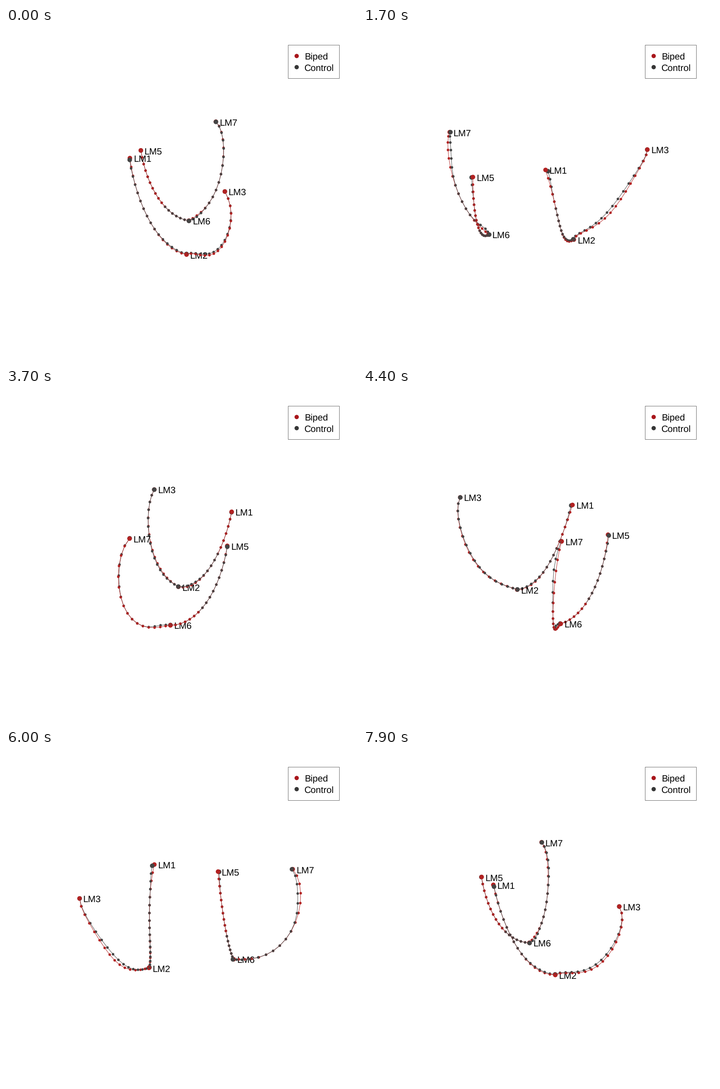
A matplotlib script that plays this animation: 768x729 px, repeating every 8 s.

```python
import numpy as np
import matplotlib.pyplot as plt
from matplotlib.animation import FuncAnimation
from matplotlib.patches import Circle, Rectangle

W, H, DPI = 768, 729, 100
PX = 72 / DPI                          # one pixel in points
FRAMES, STEP = 80, np.radians(4.8)     # one turn takes 75 frames
TILT = np.radians(20)
FOCAL = H / 2 / np.tan(np.radians(15))
RED, DARK = "#b22222", "#444444"
LANDMARKS = [0, 16, 32]
KNOTS = np.array([0, 4, 12, 16, 18, 22, 26, 30, 32])

# Key points are (right, toward the viewer, up) from the scene centre.
# The control curve adds soft bumps: (place, width, toward, up).
CURVES = [
    dict(names=("LM1", "LM2", "LM3"),
         keys=[(-108, 30, 92), (-92.4, 46, 20.3), (-30.3, 64, -90.5),
               (10.7, 78.6, -107.5), (29.8, 92.6, -99.6), (65, 144.3, -74.2),
               (88.3, 188.7, -14.4), (88.5, 224.5, 59.6), (77.6, 231, 89.7)],
         bumps=[(0, 2, 5, -2.4), (13, 3, 0, 2.4), (23, 5, -8, 0)]),
    dict(names=("LM5", "LM6", "LM7"),
         keys=[(-95, -121, 65.6), (-80.4, -124.6, -0.5), (-22.1, -123.6, -94),
               (18, -119, -111), (37.5, -138.5, -105.5), (78.6, -186.7, -74.4),
               (103.7, -223.2, -3), (99.4, -229.3, 81.8), (84.5, -219, 110.8)],
         bumps=[(0, 2, -2.7, -0.9), (18, 1.6, 8, 0), (29, 2.5, 7, 0)]),
]


def smooth(knots, values, at):
    """Polynomial through the knots, evaluated at the given places."""
    n = len(knots)
    return np.vander(at / 16, n) @ np.linalg.solve(np.vander(knots / 16, n), values)


def sample(keys):
    """33 points along a curve, with a free corner at the middle landmark."""
    keys = np.array(keys, float)
    return np.vstack([smooth(KNOTS[:4], keys[:4], np.arange(16)),
                      smooth(KNOTS[3:] - 16, keys[3:], np.arange(17))])


def shift(points, bumps):
    moved, i = points.copy(), np.arange(len(points))
    for place, width, toward, up in bumps:
        moved += np.outer(np.exp(-((i - place) / width) ** 2), (0, toward, up))
    return moved


def project(points, angle):
    """Spin about the upright axis, tilt, and project to pixels and depth."""
    a, b, up = points.T
    c, s = np.cos(angle), np.sin(angle)
    right, near = a * c + b * s, b * c - a * s
    depth = near * np.cos(TILT) + up * np.sin(TILT)
    scale = FOCAL / (FOCAL - depth)
    height = up * np.cos(TILT) - near * np.sin(TILT)
    return W / 2 + right * scale, H / 2 - height * scale, depth


plt.rcParams["text.hinting"] = "none"
fig = plt.figure(figsize=(W / DPI, H / DPI), dpi=DPI, facecolor="white")
ax = fig.add_axes([0, 0, 1, 1])
ax.set_xlim(0, W)
ax.set_ylim(H, 0)
ax.axis("off")


def label(x, y, name):
    return ax.text(x, y, name, family="Liberation Sans", fontsize=20.2 * PX,
                   color="black", ha="left", va="baseline")


def dot(x, y, size, color):
    return ax.add_patch(Circle((x, y), size / 2, fc=color, lw=0))


def strand(points, color):
    """Dots and links of one curve."""
    dots = [dot(0, 0, 10 if i in LANDMARKS else 5.6, color)
            for i in range(len(points))]
    links = [ax.plot([], [], color=color, lw=0.9 * PX)[0] for _ in dots[1:]]
    return points, dots, links


ax.add_patch(Rectangle((617, 37), 112, 73, fc="white", ec="#707070", lw=PX))
for row, (name, color) in enumerate([("Biped", "#a8161b"), ("Control", "#363636")]):
    dot(636, 61.3 + 24.4 * row, 9.4, color)
    label(653.2, 69 + 24.3 * row, name)

strands, tags = [], []
for curve in CURVES:
    points = sample(curve["keys"])
    strands.append(strand(points, RED))
    strands.append(strand(shift(points, curve["bumps"]), DARK))
    tags.append((points[LANDMARKS], [label(0, 0, n) for n in curve["names"]]))


def draw(frame):
    angle = frame * STEP
    for points, dots, links in strands:
        x, y, depth = project(points, angle)
        for i, item in enumerate(dots):
            item.set_center((x[i], y[i]))
            item.set_zorder(1000 + depth[i])
        for i, item in enumerate(links):
            item.set_data(x[i:i + 2], y[i:i + 2])
            item.set_zorder(1000 + depth[i:i + 2].mean())
    for marks, texts in tags:
        for x, y, depth, text in zip(*project(marks, angle), texts):
            text.set_position((x + 7.8, y + 8.6))
            text.set_zorder(1000 + depth)
    return []


anim = FuncAnimation(fig, draw, frames=FRAMES, interval=100, repeat=True,
                     repeat_delay=0, blit=False)
plt.show()
```
